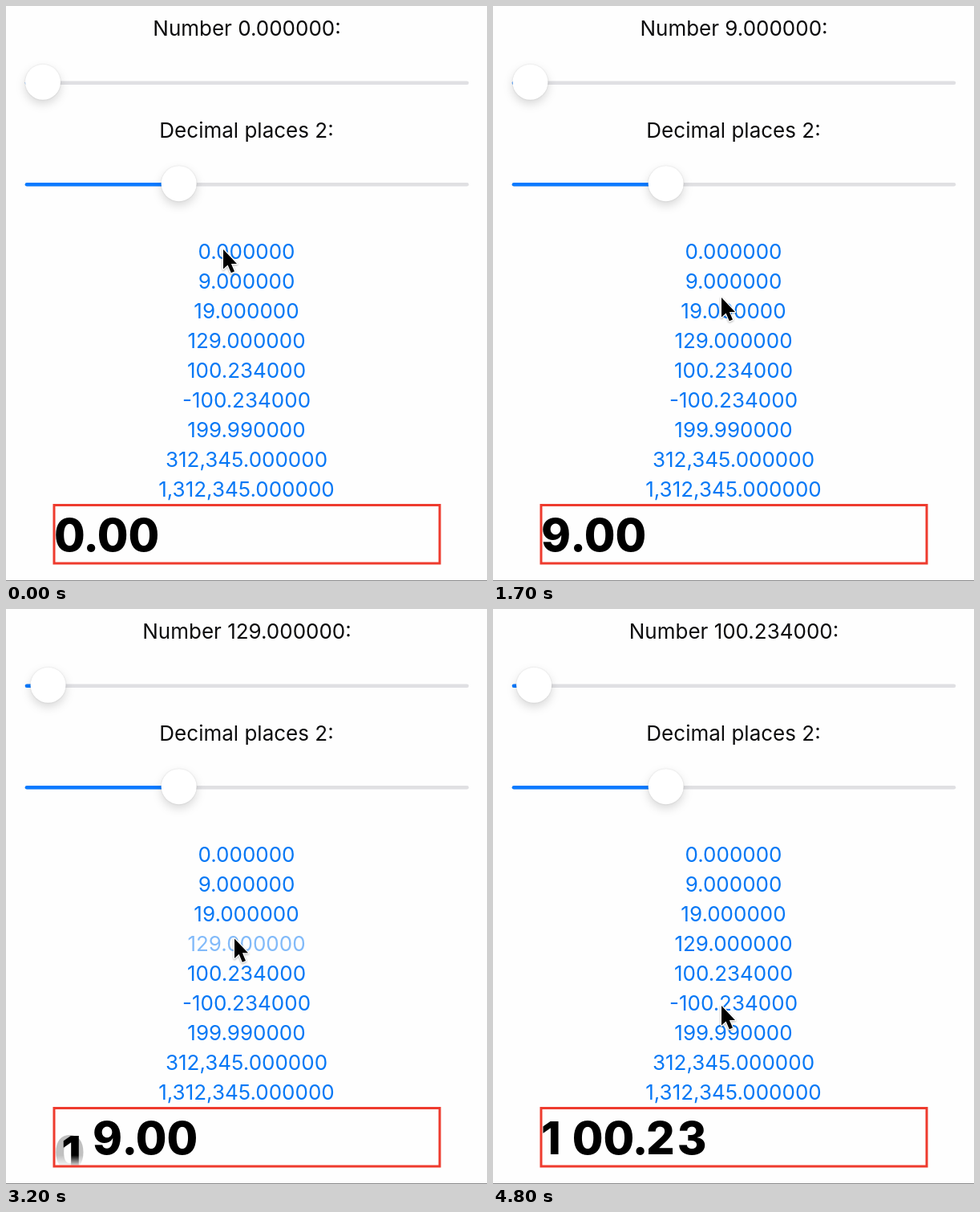
An HTML page for the animation above (5 s loop, 600 by 716 pixels).

```html
<!DOCTYPE html>
<html lang="en">
<head>
<meta charset="utf-8">
<title>Rolling number</title>
<style>
  html, body { margin: 0; width: 100%; height: 100%; overflow: hidden; background: #fefefe; }
  svg { display: block; width: 600px; height: 716px; font: 400 26px Inter, "Liberation Sans", sans-serif; }
  .label, .row { text-anchor: middle; }
  .label { fill: #0c0c0d; }
  .row { fill: #0878f5; }
  .track { stroke: #e0e0e3; }
  .filled { stroke: #0a7aff; }
  .track, .filled { stroke-width: 4.6; stroke-linecap: round; }
  .thumb { fill: #fff; filter: drop-shadow(0 0 1px rgba(0,0,0,.12)) drop-shadow(0 5px 6px rgba(0,0,0,.15)); }
  .big { font-size: 56px; font-weight: 800; fill: #000; }
  .frame { fill: none; stroke: #ee3b2e; stroke-width: 3; }
  .cursor { fill: #000; stroke: #fff; stroke-width: 2.4; stroke-linejoin: round; paint-order: stroke;
            filter: drop-shadow(0 1px 1px rgba(0,0,0,.3)); }
</style>
</head>
<body>
<svg id="stage" viewBox="0 0 600 716">
  <defs>
    <linearGradient id="fade" x2="0" y2="1">
      <stop offset="0" stop-color="#000"/>
      <stop offset=".2" stop-color="#fff"/>
      <stop offset=".8" stop-color="#fff"/>
      <stop offset="1" stop-color="#000"/>
    </linearGradient>
    <mask id="window" maskUnits="userSpaceOnUse" x="59" y="621" width="483" height="74"
          style="mask-type: luminance; color-interpolation: sRGB">
      <rect x="59" y="621" width="483" height="74" fill="url(#fade)"/>
    </mask>
  </defs>
</svg>
<script>
const LOOP = 5000, STEP = 100;
const ROLL_DELAY = 78, ROLL_TIME = 350;
const PITCH = 75, DIGIT_W = 38.7, DOT_W = 15, BASE = 679;
const values = [0, 9, 19, 129, 100.234, -100.234, 199.99, 312345, 1312345];

// [press time, row index]
const presses = [[200, 0], [1060, 1], [2000, 2], [3010, 3], [4050, 4]];

// [time, x, y] of the cursor tip
const path = [
  [0, 271, 303], [600, 270, 305], [900, 282, 339], [1500, 282, 340],
  [1700, 285, 363], [1900, 287, 371], [2600, 287, 371], [2900, 285, 408],
  [3400, 285, 412], [3500, 285, 428], [3700, 285, 428], [3900, 285, 452],
  [4400, 285, 452], [4600, 285, 479], [4800, 285, 494], [5000, 285, 494]
];

const stage = document.getElementById('stage');
const clamp = u => Math.min(1, Math.max(0, u));
const mix = (a, b, u) => a + (b - a) * u;
const smooth = u => u * u * (3 - 2 * u);

function add(tag, attrs, parent = stage, text = '') {
  const el = document.createElementNS('http://www.w3.org/2000/svg', tag);
  for (const key in attrs) el.setAttribute(key, attrs[key]);
  el.textContent = text;
  parent.append(el);
  return el;
}

function addSlider(y) {
  add('line', { class: 'track', x1: 26, x2: 575, y1: y, y2: y });
  const filled = add('line', { class: 'filled', x1: 26, x2: 46, y1: y, y2: y });
  const thumb = add('circle', { class: 'thumb', cx: 46, cy: y - 1, r: 22 });
  return part => {
    const x = 46 + 509 * part;
    filled.setAttribute('x2', x);
    thumb.setAttribute('cx', x);
  };
}

const format = v => v.toLocaleString('en-US', { minimumFractionDigits: 6 });

const title = add('text', { class: 'label', x: 300.5, y: 37 });
const setNumber = addSlider(95.8);
add('text', { class: 'label', x: 300, y: 163.5 }, stage, 'Decimal places 2:');
addSlider(222.2)(2 / 6);

const rows = values.map((v, i) =>
  add('text', { class: 'row', x: 300, y: 314.7 + 37.05 * i }, stage, format(v)));

// One column per place; power null is the decimal point.
const counter = add('g', { class: 'big', mask: 'url(#window)' });
const columns = [4, 3, 2, null, 1, 0].map(power => {
  const group = add('g', {}, counter);
  if (power === null) {
    add('text', { x: DOT_W / 2, y: BASE, 'text-anchor': 'middle' }, group, '.');
  } else {
    for (let d = 0; d < 10; d++) add('text', { y: BASE - d * PITCH }, group, d);
  }
  return { group, power };
});
add('rect', { class: 'frame', x: 60, y: 621.5, width: 481, height: 72.5 });
add('rect', { y: 715, width: 600, height: 1, fill: '#8b8b8d' });
const cursor = add('path', {
  class: 'cursor',
  d: 'M0 0V24.5L5.6 19.4L9.8 29.3L14 27.5L9.9 17.9H17Z'
});

const digit = (v, power) => Math.floor(Math.trunc(v * 100 + 1e-6) / 10 ** power) % 10;
const shown = (v, power) => power < 3 || v * 100 >= 10 ** power ? 1 : 0;

function drawCounter(from, to, p) {
  let x = 60;
  for (const { group, power } of columns) {
    let y = 0, seen = 1;
    if (power !== null) {
      y = PITCH * mix(digit(from, power), digit(to, power), p);
      seen = mix(shown(from, power), shown(to, power), p);
    }
    group.setAttribute('transform', `translate(${x} ${y})`);
    group.setAttribute('opacity', seen);
    x += seen * (power === null ? DOT_W : DIGIT_W);
  }
}

function rowOpacity(age) {
  if (age < 0) return 1;
  return mix(1, .5, clamp(age / 40)) + .5 * clamp((age - 260) / 180);
}

function draw(t) {
  let from = 0, to = 0, p = 1;
  for (const [start, i] of presses) {
    rows[i].setAttribute('opacity', rowOpacity(t - start));
    const age = t - start - ROLL_DELAY;
    if (age >= 0) {
      from = to;
      to = values[i];
      p = smooth(clamp(age / ROLL_TIME));
    }
  }
  title.textContent = `Number ${format(to)}:`;
  setNumber(to / 10000);
  drawCounter(from, to, p);

  const k = path.findIndex(point => point[0] > t);
  const [t0, x0, y0] = path[k - 1], [t1, x1, y1] = path[k];
  const u = (t - t0) / (t1 - t0);
  cursor.setAttribute('transform', `translate(${mix(x0, x1, u)} ${mix(y0, y1, u)})`);
}

const begin = performance.now();
function tick() {
  const t = (performance.now() - begin) % LOOP;
  draw(Math.floor(t / STEP) * STEP);
  requestAnimationFrame(tick);
}
tick();
</script>
</body>
</html>
```
